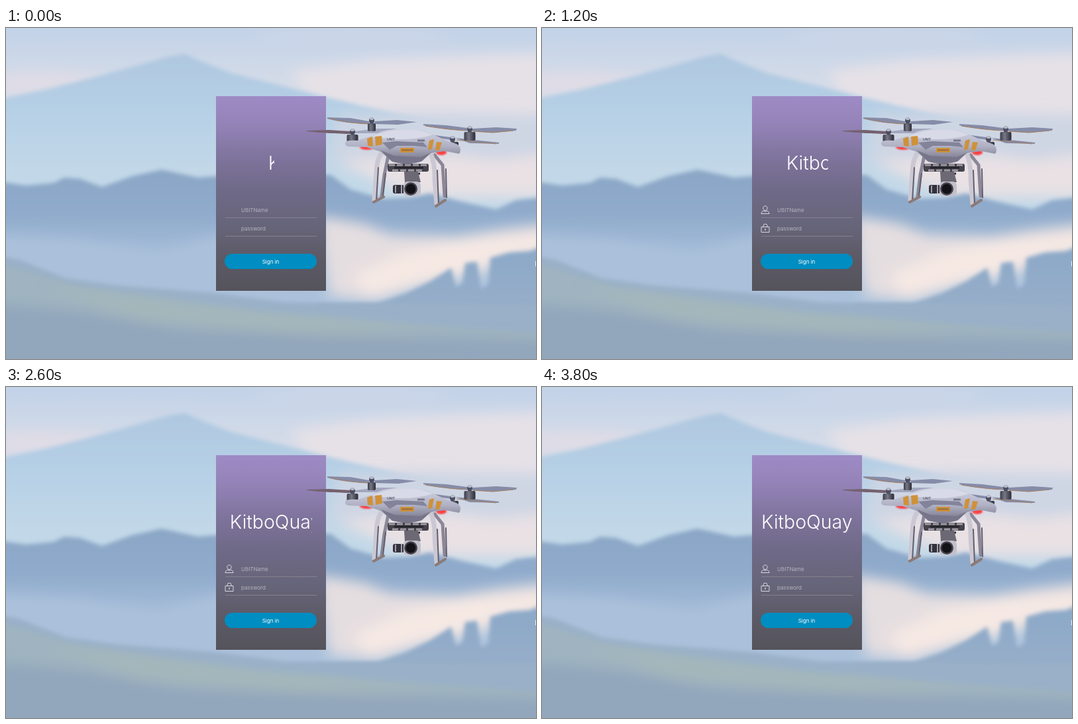
These frames come from a looping animation (800x500 px, 3.9 s). An HTML page:

```html
<!DOCTYPE html>
<html lang="en">
<head>
<meta charset="utf-8">
<title>Sign in</title>
<style>
  html, body { margin: 0; width: 800px; height: 500px; overflow: hidden; }
  body { position: relative; font-family: Inter, sans-serif; }
  .scene { position: absolute; left: 0; top: 0; display: block; }
  .panel {
    position: absolute; left: 317px; top: 103px; width: 166px; height: 294px;
    background: linear-gradient(#9e8bc5, #9483b8 14%, #7c7299 34%, #6e6986 50%, #67657a 66%, #5b5964 85%, #55535b);
  }
  .title {
    position: absolute; left: 50%; top: 82px; height: 38px; transform: translateX(-50%);
    overflow: hidden; white-space: nowrap; color: #fff;
    font-size: 28.5px; font-weight: 300; line-height: 38px;
  }
  .title span { display: inline-block; }
  .field {
    position: absolute; left: 14px; width: 114px; height: 21px; padding-left: 24px;
    border-bottom: 1px solid #85818f; color: #b6b2bf; font-size: 8px; line-height: 20px;
  }
  .button {
    position: absolute; left: 13px; top: 238px; width: 139px; height: 23px;
    border-radius: 12px; background: #008dc1; color: #fff;
    font-size: 8px; line-height: 24px; text-align: center;
  }
  .icons { position: absolute; left: 0; top: 0; fill: none; stroke: #e6e3ee; stroke-width: .9; }
  .icons path { stroke-dasharray: 1 1; }
</style>
</head>
<body>
<svg class="scene" width="800" height="500" viewBox="0 0 800 500">
  <defs>
    <filter id="soft" x="-10%" y="-10%" width="120%" height="120%"><feGaussianBlur stdDeviation="3"/></filter>
    <filter id="haze" x="-30%" y="-40%" width="160%" height="180%"><feGaussianBlur stdDeviation="10"/></filter>
    <linearGradient id="sky" x2="0" y2="1">
      <stop stop-color="#c2d2e8"/><stop offset=".1" stop-color="#cdd8e8"/><stop offset=".22" stop-color="#dadde8"/>
    </linearGradient>
    <linearGradient id="far" gradientUnits="userSpaceOnUse" x1="0" y1="40" x2="0" y2="215">
      <stop stop-color="#afc8e0"/><stop offset=".45" stop-color="#b5cfe5"/><stop offset="1" stop-color="#c2d8e8"/>
    </linearGradient>
    <linearGradient id="ridge" gradientUnits="userSpaceOnUse" x1="0" y1="220" x2="0" y2="370">
      <stop stop-color="#8ba6c6"/><stop offset=".4" stop-color="#90abcc"/><stop offset="1" stop-color="#adc4dd"/>
    </linearGradient>
    <linearGradient id="near" gradientUnits="userSpaceOnUse" x1="0" y1="335" x2="0" y2="500">
      <stop stop-color="#8ca9c9"/><stop offset=".5" stop-color="#96adc8"/><stop offset="1" stop-color="#8da3bd"/>
    </linearGradient>
  </defs>

  <rect width="800" height="500" fill="url(#sky)"/>
  <g filter="url(#haze)">
    <path fill="#e6e1e7" d="M430 66L560 48L830 38V140H480Z"/>
    <ellipse cx="50" cy="83" rx="110" ry="15" fill="#e0dce6"/>
    <ellipse cx="520" cy="12" rx="150" ry="14" fill="#cbd6e8"/>
  </g>
  <path filter="url(#soft)" fill="url(#far)" d="M-30 111L60 93L130 75L200 56L245 43L270 39L292 49L340 68L420 88L490 106L590 130L700 150L830 170V530H-30Z"/>
  <g filter="url(#haze)">
    <path fill="#ced6e4" d="M500 130L650 128L830 132V205H490Z"/>
    <path fill="#e9e1e4" d="M500 204L580 194L680 192L740 200L830 188V256H620Z"/>
  </g>
  <path filter="url(#soft)" fill="url(#ridge)" d="M-30 229L30 238L72 234L88 226L112 228L145 240L190 224L235 214L290 226L350 221L490 222L520 244L570 258L610 256L640 250L690 263L740 274L770 260L830 254V530H-30Z"/>
  <g filter="url(#haze)">
    <path fill="#abc1db" d="M-30 312L110 320L230 340L310 315L480 325V420H-30Z"/>
    <path fill="#e5dee0" d="M470 284L540 296L580 312L680 315L740 305L830 294V360L730 365L650 384L560 412L490 404Z"/>
    <path fill="#f6e9e4" d="M525 375L600 340L680 322L830 308V330L740 348L700 372L640 380L545 404Z"/>
  </g>
  <path filter="url(#soft)" fill="url(#near)" d="M470 418L560 416L605 400L640 383L672 362L679 391L689 386L693 355L711 353L717 394L728 387L731 347L760 339L790 337L830 322V530H470Z"/>
  <g filter="url(#soft)">
    <path fill="#9ab0c8" d="M-30 340L20 350L90 378L170 389L310 400L420 414L560 416L830 420V530H-30Z"/>
    <path fill="#9fb4c0" d="M-30 350L40 370L110 390L250 410L390 430L560 442L830 462V530H-30Z"/>
  </g>
  <g filter="url(#haze)">
    <path fill="#92a6bc" d="M-30 415L110 428L260 455L470 464L830 472V530H-30Z"/>
    <path fill="#a5b8ba" d="M60 392L280 422L480 442L640 462L450 460L200 436Z"/>
  </g>
  <rect x="799" y="352" width="1" height="8" fill="#eceef3"/>
</svg>

<main class="panel">
  <div class="title"><span>KitboQuay</span></div>
  <div class="field" style="top:162px">UBITName</div>
  <div class="field" style="top:190px">password</div>
  <div class="button">Sign in</div>
  <svg class="icons" width="166" height="294" viewBox="317 103 166 294">
    <path pathLength="1" d="M337 268.8a3.2 3.4 0 1 1-.1 0Z"/>
    <path pathLength="1" d="M331 280.5H343C343 277.8 341 276.5 339 276.3L337 277.3L335 276.3C333 276.5 331 277.8 331 280.5"/>
    <path pathLength="1" d="M331 308.5H343V300.5H331V308.5"/>
    <path pathLength="1" d="M340 300.5V299A3 3 0 0 0 334 299V300.5"/>
    <path pathLength="1" d="M337 303.3V305.5" stroke-width="1.5"/>
  </svg>
</main>

<svg class="scene" width="800" height="500" viewBox="0 0 800 500">
  <defs>
    <filter id="glow" x="-50%" y="-50%" width="200%" height="200%"><feGaussianBlur stdDeviation="1"/></filter>
    <linearGradient id="hull" x2="0" y2="1">
      <stop stop-color="#d3d5e4"/><stop offset=".5" stop-color="#b0b1c4"/><stop offset="1" stop-color="#6f6c7e"/>
    </linearGradient>
    <linearGradient id="motor">
      <stop stop-color="#3b3a45"/><stop offset=".4" stop-color="#777988"/><stop offset="1" stop-color="#2a2a33"/>
    </linearGradient>
  </defs>
  <g fill="#858ca8">
    <path d="M485 135L520 136L548 141V145Q510 144 485 137Z"/>
    <path d="M556 141L590 139L620 142L592 146L557 145Z"/>
    <path d="M630 145L665 147L696 151V155Q655 153 630 147Z"/>
    <path d="M704 152L740 150L771 152L770 155L735 158L704 156Z"/>
    <path d="M602 155L640 161L671 165V169L630 163Z"/>
    <path d="M678 166L715 170L744 173V175L700 174Z"/>
  </g>
  <path fill="#75616f" d="M454 155L488 154L520 156V160Q480 159 454 156Z"/>
  <path fill="#a3a8bf" d="M527 156L560 152L590 152L560 159L527 159Z"/>
  <path stroke="#a67d5e" fill="none" d="M488 137Q520 144 547 145M633 148Q670 154 695 155M705 156L735 158L766 155M680 169L740 175"/>
  <g id="motors"></g>
  <g fill="none" stroke="#cbc8d3" stroke-linecap="round" stroke-linejoin="round">
    <path stroke="#8b8798" stroke-width="5" d="M577 193L571 222L567 254"/>
    <path stroke-width="7" d="M567 188Q559 200 559 220L556 259"/>
    <path stroke="#8b8798" stroke-width="5" d="M647 192L659 207L662 254"/>
    <path stroke-width="7" d="M641 189Q648 207 647 228L650 265"/>
    <path stroke="#625d6c" stroke-width="2" d="M562 211L559 261M573 220L569 254M651 215L653 267M664 213L665 256"/>
    <path stroke="#8c7a76" stroke-width="4" d="M555 263L570 255M649 269L663 260"/>
  </g>
  <g filter="url(#glow)" fill="#fb3f42">
    <ellipse cx="545" cy="180" rx="11" ry="4"/>
    <ellipse cx="657" cy="188" rx="8" ry="4"/>
  </g>
  <path fill="url(#hull)" d="M512 173Q514 169 530 170L548 164L568 156Q604 148 637 157L660 168L682 176Q689 183 684 190L663 186L641 189L628 201Q605 209 582 201L566 187L544 180L516 179Q511 177 512 173Z"/>
  <path fill="#77758a" d="M566 185L586 193L626 195L642 188L626 202Q605 208 583 202Z"/>
  <path fill="#d9dae8" d="M550 164Q604 145 644 161Q622 169 588 168Z"/>
  <path fill="#83849a" d="M568 173L589 171L630 173L636 180L616 178L590 178L579 184Z"/>
  <g fill="#cf9138">
    <path d="M545 167L553 164L554 179L546 178Z"/>
    <path d="M557 164L567 163L568 176L558 178Z"/>
    <path d="M639 170L646 168L643 183L637 184Z"/>
    <path d="M650 172L658 173L654 185L648 185Z"/>
    <rect x="595" y="181" width="21" height="7" rx="1"/>
  </g>
  <rect x="597" y="183" width="17" height="3" fill="#a5763c"/>
  <text x="575" y="170" font-size="5" font-weight="600" fill="#505263">UNIT</text>
  <path stroke="#76788b" stroke-width="3" d="M621 170H632"/>
  <rect x="576" y="205" width="62" height="12" rx="3" fill="#45424b"/>
  <path fill="none" stroke="#9f9ba6" stroke-width="3" stroke-dasharray="9 3" d="M578 207H637M583 215H630"/>
  <path stroke="#25242b" stroke-width="3" d="M586 211H630M604 220H625"/>
  <path fill="#6c6975" d="M601 217H622L626 233H602Z"/>
  <rect x="584" y="237" width="17" height="13" rx="3" fill="#34323b"/>
  <path stroke="#a19eab" stroke-width="2" d="M588 238V249M597 237V250"/>
  <rect x="600" y="232" width="26" height="22" rx="6" fill="#c2c0cb"/>
  <circle cx="611" cy="243" r="10" fill="#45424d"/>
  <circle cx="611" cy="243" r="7.5" fill="#121217"/>
</svg>

<script>
  const LOOP = 3900, TICK = 100, DRAW = 1150;
  // time in ms, share of the title that is open
  const REVEAL = [[0, .063], [900, .37], [1600, .567], [2000, .706], [2600, .902], [2950, 1], [LOOP, 1]];

  const title = document.querySelector('.title');
  const word = title.firstElementChild;
  const strokes = document.querySelectorAll('.icons path');

  const motors = [[552, 140, 12, 12], [523, 157, 17, 16], [700, 153, 17, 13], [674, 168, 18, 13]];
  document.getElementById('motors').innerHTML = motors.map(([x, y, w, h]) => `
    <rect x="${x - w / 2}" y="${y + 4}" width="${w}" height="${h}" rx="2" fill="url(#motor)"/>
    <ellipse cx="${x}" cy="${y}" rx="4" ry="5" fill="#4e5062"/>
    <ellipse cx="${x}" cy="${y - 3}" rx="3" ry="2" fill="#b8bccb"/>`).join('');

  function sample(steps, t) {
    const i = steps.findIndex(step => step[0] > t);
    const [t0, a] = steps[i - 1], [t1, b] = steps[i];
    return a + (b - a) * (t - t0) / (t1 - t0);
  }

  const start = performance.now();
  function render() {
    const elapsed = Math.max(0, performance.now() - start) % LOOP;
    const t = Math.floor(elapsed / TICK) * TICK;
    title.style.width = word.offsetWidth * sample(REVEAL, t) + 'px';
    const drawn = Math.min(1, t / DRAW);
    for (const path of strokes) {
      path.style.strokeDashoffset = 1 - drawn;
      path.style.visibility = drawn ? 'visible' : 'hidden';
    }
    requestAnimationFrame(render);
  }
  render();
</script>
</body>
</html>
```
